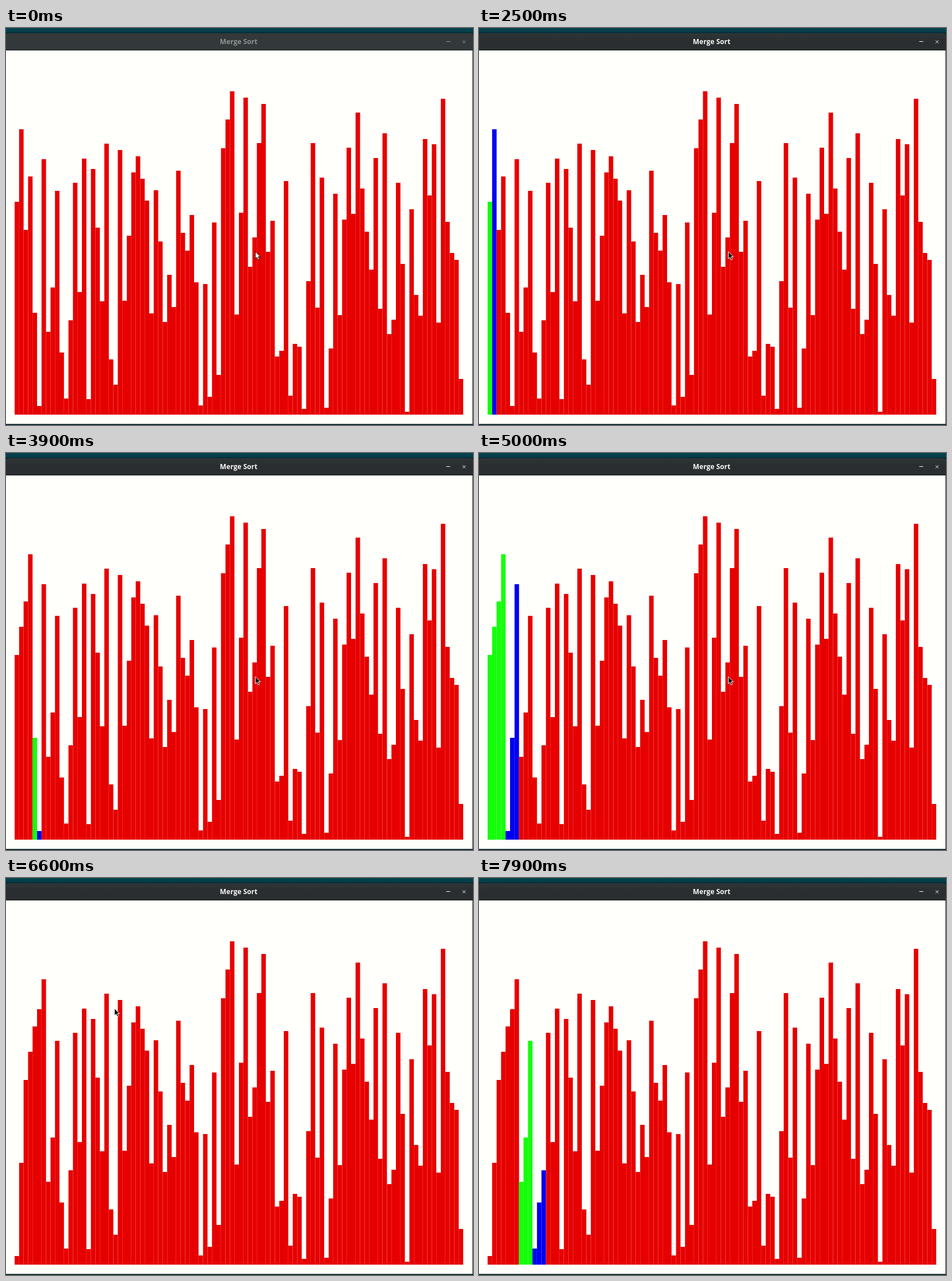
These frames come from a looping animation (812x690 px, 8 s). An HTML page with a canvas:

```html
<!DOCTYPE html>
<html lang="en">
<head>
<meta charset="utf-8">
<title>Merge Sort</title>
<style>
  html, body { margin: 0; width: 100%; height: 100%; overflow: hidden; background: #fffffc; }
  #stage { position: relative; width: 812px; height: 690px; overflow: hidden; background: #fffffc; }
  #desk { position: absolute; inset: 0 0 auto; height: 20px; background: linear-gradient(#05454f, #043c46 7px, #02262c 9px); }
  #bar {
    position: absolute; top: 9px; left: 0; width: 812px; height: 30px; box-sizing: border-box;
    border-bottom: 1px solid #1b1e1f; border-radius: 4px 4px 0 0;
    background: linear-gradient(#2f3537, #2a2e30 12px); color: #f4f4f2;
    font: 700 12px/30px "Open Sans", sans-serif; text-align: center;
  }
  #bar.idle { background: #33383a; color: #8d9190; }
  #title { position: absolute; left: 0; top: 0; width: 809px; }
  #bar svg { position: absolute; left: 760px; top: 5px; }
  canvas { position: absolute; left: 0; top: 0; }
  #right { position: absolute; right: 0; top: 39px; width: 1px; bottom: 0; background: #2c3234; }
  #bottom { position: absolute; left: 0; right: 0; bottom: 0; height: 2px; background: linear-gradient(#2c3234 1px, #0a3a42 1px); }
</style>
</head>
<body>
<div id="stage">
  <div id="desk"></div>
  <div id="bar">
    <div id="title">Merge Sort</div>
    <svg width="44" height="20" fill="none" stroke="currentColor">
      <path d="M5.5 9.5h7M34 7.5l5 5M39 7.5l-5 5"/>
    </svg>
  </div>
  <div id="right"></div>
  <div id="bottom"></div>
  <canvas width="812" height="690"></canvas>
</div>
<script>
const LOOP = 8000, LEFT = 15, STEP = 7.8, FLOOR = 672;
const RED = '#e60000', GREEN = '#14ff0a', BLUE = '#0000f0';

// The unsorted values, as the top edge of each bar
const tops = [
  302, 176, 351, 258, 495, 657, 228, 528, 451, 283,
  564, 644, 508, 269, 459, 227, 645, 245, 347, 475,
  201, 576, 620, 212, 474, 361, 251, 223, 262, 300,
  496, 282, 371, 511, 429, 485, 248, 356, 387, 325,
  442, 656, 445, 641, 338, 603, 209, 159, 110, 498,
  321, 121, 415, 364, 200, 132, 389, 335, 571, 561,
  266, 639, 549, 554, 662, 440, 200, 486, 260, 660,
  557, 288, 499, 333, 208, 323, 147, 279, 354, 420,
  226, 488, 183, 532, 507, 269, 410, 667, 315, 464,
  500, 193, 291, 202, 512, 123, 337, 391, 403, 610
];

// Tenths of a second at which each merge is highlighted, then applied
const cues = [25, 27, 30, 32, 35, 38, 39, 44, 44, 49, 50, 60, 61, 63, 64, 66, 68, 72, 73, 78, 79];
const arrow = new Path2D('M.5 .8V13L3.4 10.4 5.4 15 7.6 14 5.6 9.6H9.3Z');

const ctx = document.querySelector('canvas').getContext('2d');
const bar = document.getElementById('bar');

function* mergeSort(values, colors, low = 0, high = values.length) {
  if (high - low < 2) return;
  const mid = Math.ceil((low + high) / 2);
  yield* mergeSort(values, colors, low, mid);
  yield* mergeSort(values, colors, mid, high);
  colors.fill(GREEN, low, mid).fill(BLUE, mid, high);
  yield;
  colors.fill(RED);
  values.splice(low, high - low, ...values.slice(low, high).sort((a, b) => b - a));
  yield;
}

function drawBars(t) {
  const values = tops.slice();
  const colors = values.map(() => RED);
  const sort = mergeSort(values, colors);
  cues.filter(cue => cue * 100 <= t).forEach(() => sort.next());
  values.forEach((top, i) => {
    ctx.fillStyle = colors[i];
    ctx.fillRect(LEFT + STEP * i, top, STEP, FLOOR - top);
  });
}

function pointerAt(t) {
  if (t < 6300) return [433, 388];
  if (t < 6800) return [188, 226];
  return t < 7200 ? [75, 80] : [63, 59];
}

function drawPointer(t) {
  if (t >= 7400) return;
  const light = t < 100;
  ctx.save();
  ctx.translate(...pointerAt(t));
  ctx.fillStyle = light ? '#fff' : '#000';
  ctx.strokeStyle = light ? '#111' : '#fff';
  ctx.fill(arrow);
  ctx.stroke(arrow);
  ctx.restore();
}

const origin = performance.now();
function frame() {
  const t = (performance.now() - origin) % LOOP;
  bar.classList.toggle('idle', t < 800);
  ctx.clearRect(0, 0, 812, 690);
  drawBars(t);
  drawPointer(t);
  requestAnimationFrame(frame);
}
frame();
</script>
</body>
</html>
```
